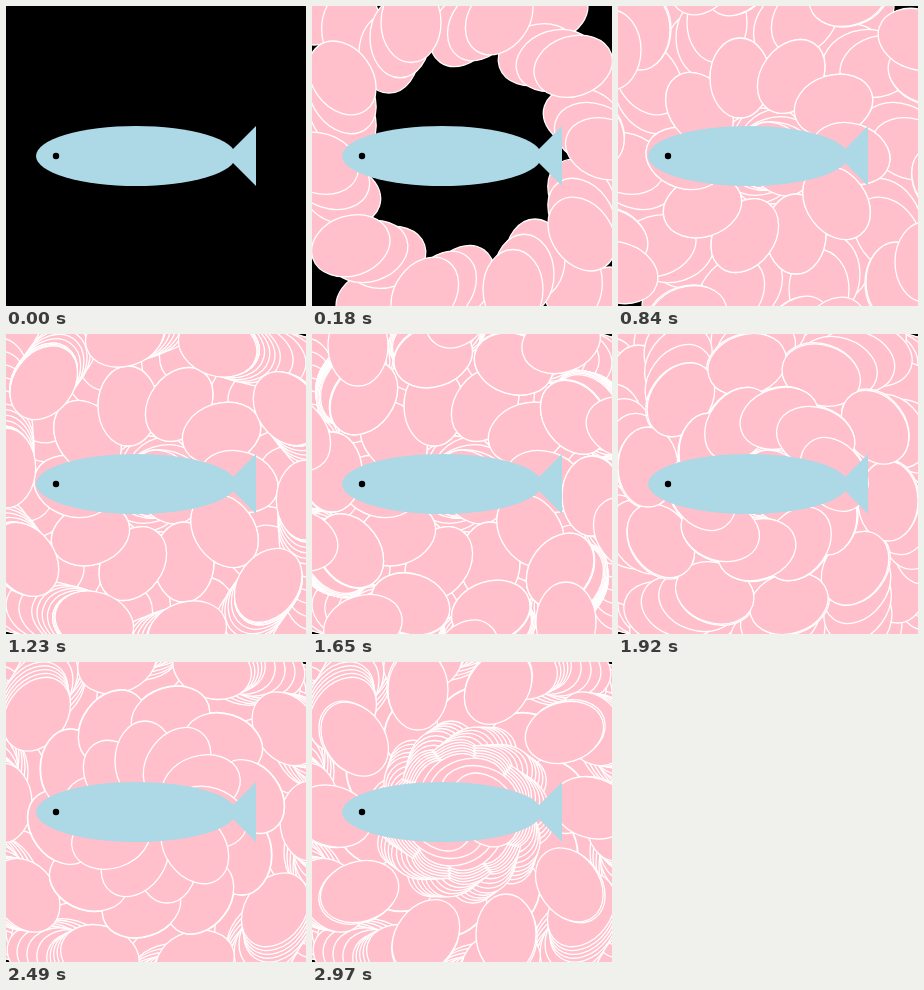
These frames come from a looping animation (300x300 px, 3000 ms). An HTML page with a canvas:

```html
<!DOCTYPE html>
<html lang="en">
<head>
<meta charset="utf-8">
<title>Fish and petals</title>
<style>
  html, body { margin: 0; width: 100%; height: 100%; overflow: hidden; background: #000; }
  canvas { display: block; width: 300px; height: 300px; }
</style>
</head>
<body>
<canvas id="stage" width="300" height="300"></canvas>
<script>
const ctx = document.getElementById('stage').getContext('2d');
const SIZE = 300, STEP = 30, STEPS = 100, PETALS = 10;

// Pointer path as [step, x, y], measured from the centre of the stage.
const path = [
  [0, 260, 260], [1, 185, 175], [4, 73, 103], [6, 51, 133.5],
  [7, 43, 28], [12, 25, 38], [18, 4, 6], [23, 6, 8],
  [24, 28, 78], [25, 28, 78], [26, 127, 127], [27, 128, 126], [28, 157, 106],
  [33, 152, 40], [37, 152, 18], [39, 152, 18], [45, 147, 12], [47, 147, 12],
  [50, 144, 15], [51, 131, 12], [53, 130, 12], [54, 130, 12],
  [55, 104, 138], [57, 155, 60], [60, 121, 16], [61, 120, 17],
  [62, 60, 30], [64, 59, 31],
  [65, 100, 20], [68, 158, 40], [72, 170, 60], [76, 165, 20], [80, 154, 9],
  [81, 86, 43], [82, 85.5, 43], [83, 11, 51],
  [87, 25, 41], [91, 30, 22], [96, 20, 12], [97, 20, 12],
  [98, 45, 124], [99, 44, 122]
];

function pointerAt(step) {
  const next = path.findIndex(p => p[0] >= step);
  const [s1, x1, y1] = path[next];
  if (s1 === step) return [x1, y1];
  const [s0, x0, y0] = path[next - 1];
  const k = (step - s0) / (s1 - s0);
  return [x0 + (x1 - x0) * k, y0 + (y1 - y0) * k];
}

function ellipse(x, y, rx, ry) {
  ctx.beginPath();
  ctx.ellipse(x, y, rx, ry, 0, 0, Math.PI * 2);
}

function drawWreath(x, y) {
  ctx.save();
  ctx.translate(SIZE / 2, SIZE / 2);
  ctx.fillStyle = 'pink';
  ctx.strokeStyle = 'white';
  ctx.lineWidth = 1.3;
  for (let i = 0; i < PETALS; i++) {
    ellipse(x, y, 30, 40);
    ctx.fill();
    ctx.stroke();
    ctx.rotate(Math.PI * 2 / PETALS);
  }
  ctx.restore();
}

function drawFish() {
  ctx.fillStyle = 'lightblue';
  ellipse(130, 150, 100, 30);
  ctx.fill();
  ctx.beginPath();
  ctx.moveTo(220, 150);
  ctx.lineTo(250, 120);
  ctx.lineTo(250, 180);
  ctx.fill();
  ctx.fillStyle = 'black';
  ellipse(50, 150, 3.2, 3.2);
  ctx.fill();
}

// Wreaths pile up along the path; the fish stays on top.
function render(step) {
  ctx.fillStyle = 'black';
  ctx.fillRect(0, 0, SIZE, SIZE);
  for (let s = 0; s <= step; s++) drawWreath(...pointerAt(s));
  drawFish();
}

let shown = -1;
const start = performance.now();

function tick() {
  const step = Math.floor((performance.now() - start) / STEP) % STEPS;
  if (step !== shown) render(shown = step);
  requestAnimationFrame(tick);
}
tick();
</script>
</body>
</html>
```
